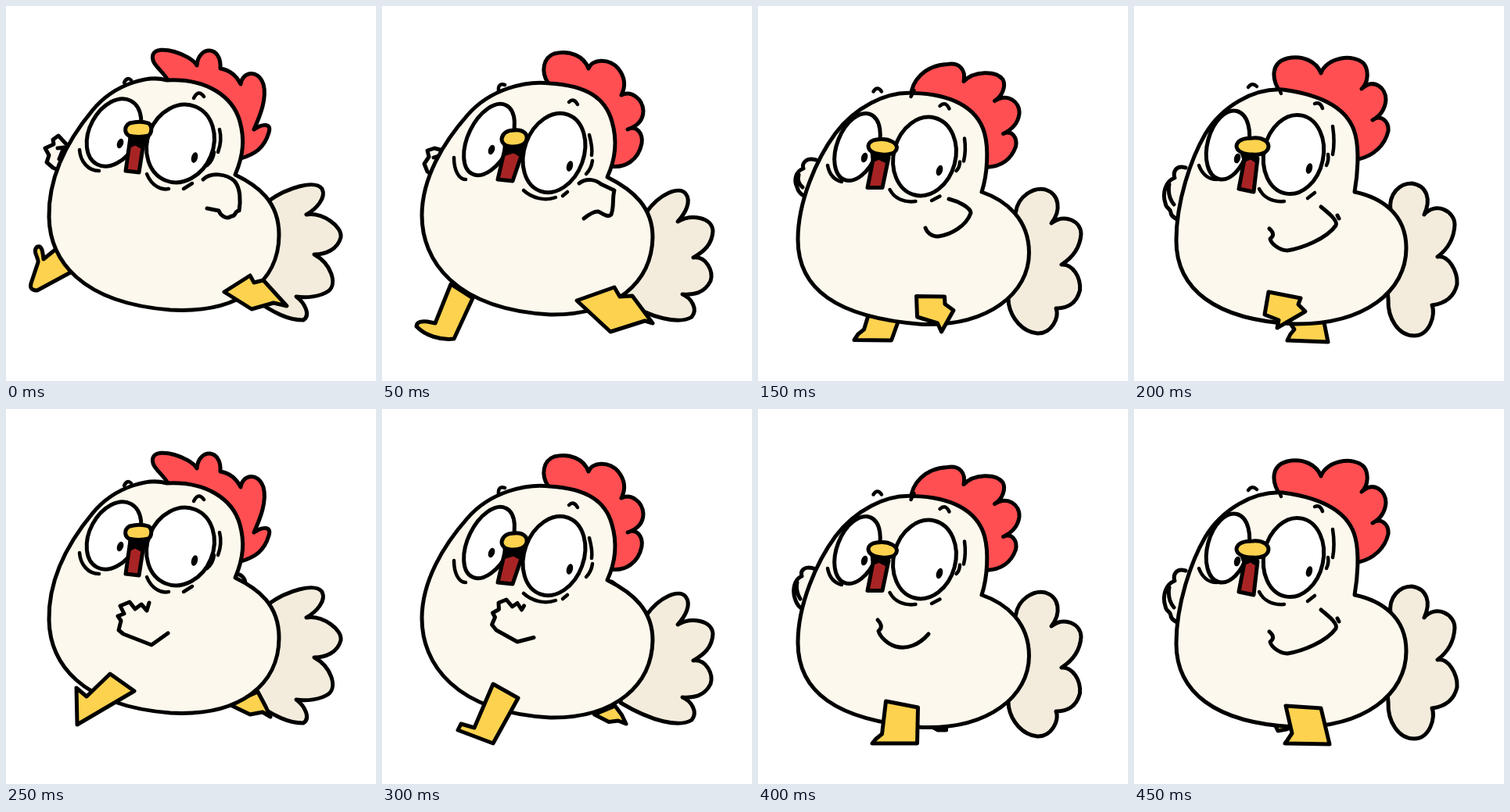
An HTML page for the animation above (0.5 s loop, 473 px wide and 480 px high).

```html
<!DOCTYPE html>
<html lang="en">
<head>
<meta charset="utf-8">
<title>Running chicken</title>
<style>
html, body { margin: 0; width: 100%; height: 100%; overflow: hidden; background: #fff; }
svg { display: block; width: 100vw; height: 100vh; }
</style>
</head>
<body>
<svg id="stage" viewBox="0 0 473 480" stroke="#000" stroke-width="5" stroke-linejoin="round" stroke-linecap="round"></svg>
<script>
const NS = 'http://www.w3.org/2000/svg';
const CREAM = '#fdf8ed', TAIL = '#f3ecdd', RED = '#ff4f52', YELLOW = '#fdd24f';
const STEP = 50;

// Blends two strings that share the same layout of numbers.
function mix(a, b, k = 0.5) {
  const nums = b.match(/-?[\d.]+/g);
  let i = 0;
  return a.replace(/-?[\d.]+/g, n => +(n * (1 - k) + nums[i++] * k).toFixed(2));
}

function mixPose(a, b, k) {
  const out = {};
  for (const key in a) out[key] = mix(a[key], b[key], k);
  return out;
}

// Ellipses are "cx cy rx ry angle".
const stretch = {
  tail: 'M335 250C360 232 395 222 404 234C410 246 396 260 384 267C405 264 430 282 428 296C424 312 408 318 394 318C416 330 424 356 412 365C402 372 384 374 371 372C382 380 390 396 380 402C362 402 345 395 312 372L320 300Z',
  comb: 'M207 95C200 82 184 74 188 62C194 48 236 62 244 76C246 50 276 50 274 80C285 82 294 88 300 100C302 84 322 80 329 100C334 118 325 140 317 158C328 150 340 150 336 162C330 182 318 190 300 195L280 130Z',
  body: 'M205 95C185 88 140 98 111 133C81 169 54 215 55 270C56 325 95 380 210 389C300 394 349 352 349 293C349 250 322 230 293 216C304 190 305 170 299 148C290 115 255 92 205 95Z',
  eyeL: '138 162 31 46 28', eyeR: '223 176 42 51 22',
  pupilL: '146 176 4 6.5 20', pupilR: '241 194 4 7 15',
  mouth: 'M159 168L153 211L170 213L177 168Z',
  maw: 'M157 168L157 182L165 178L174 183L178 168Z',
  beak: 'M158 150C166 148 176 148 182 150C187 153 187 162 182 166C175 168 164 168 157 166C151 162 151 154 158 150Z',
  lines: 'M94 184C95 199 105 211 119 211M180 215C186 230 198 236 208 234M273 158C276 170 274 179 271 187M266 187C265 195 262 200 257 204M227 234L238 227M151 98Q155 90 160 95M240 118Q246 106 253 116'
};

const drop = {
  tail: 'M338 264C355 240 380 230 388 240C396 250 388 265 378 276C395 266 422 270 423 288C422 305 412 314 398 322C415 320 424 340 420 352C412 368 398 370 384 369C396 374 404 388 396 398C380 408 345 400 305 376L310 300Z',
  comb: 'M212 98C203 84 206 66 220 61C240 56 258 64 264 80C268 68 290 66 302 80C310 90 312 102 306 114C318 108 333 118 334 134C334 146 326 154 314 158C326 152 334 164 332 176C328 196 312 208 292 205L270 150Z',
  body: 'M215 99C185 95 138 106 109 140C79 174 51 220 51 268C51 325 92 388 215 395C300 396 345 352 346 296C346 258 322 236 288 219C299 195 301 172 294 148C286 118 262 102 215 99Z',
  eyeL: '137 171 27 49 26', eyeR: '220 188 38 52 20',
  pupilL: '140 184 4 6.5 20', pupilR: '240 205 4 7 15',
  mouth: 'M157 183L148 222L167 224L181 183Z',
  maw: 'M155 178L155 192L168 188L177 193L182 180Z',
  beak: 'M169 159C180 158 186 163 185 170C184 177 176 180 168 180C158 180 153 176 153 170C154 163 160 159 169 159Z',
  lines: 'M92 194C92 210 98 222 107 222M181 236C192 246 208 250 222 245M265 165C268 176 269 184 268 191M269 198C268 206 265 211 261 215M231 243L237 238M149 109Q148 98 157 101M239 123Q245 117 250 126'
};

const squash = {
  tail: 'M331 266C340 246 365 236 380 243C396 252 396 275 379 289C398 280 416 288 416 304C414 322 403 333 388 341C403 342 412 355 410 372C405 388 394 394 381 391C386 402 372 418 356 416C338 412 324 400 316 388L310 300Z',
  comb: 'M203 120C218 100 250 80 288 82C300 82 298 92 287 107C305 100 328 104 332 114C334 122 326 132 314 137C332 130 348 140 346 156C344 168 334 176 322 181C332 178 338 188 334 200C326 216 314 219 297 217L270 160Z',
  body: 'M208 116C175 112 135 132 107 162C77 196 48 250 48 298C48 360 94 396 215 408C295 412 345 370 345 322C345 280 318 252 290 238C301 215 302 180 296 160C286 130 255 112 208 116Z',
  eyeL: '134 183 26 45 28', eyeR: '222 195 41 51 18',
  pupilL: '140 193 4 6.5 20', pupilR: '240 213 4 7 20',
  mouth: 'M154 192L146 231L165 227L176 193Z',
  maw: 'M152 188L151 200L160 197L172 201L178 190Z',
  beak: 'M163 172C173 172 183 178 183 183C182 190 173 191 165 190C157 189 151 185 151 179C152 174 157 172 163 172Z',
  lines: 'M95 204C95 214 99 223 108 228M177 236C183 247 195 253 211 250M274 185C275 193 274 200 272 207M268 209C267 213 265 216 261 218M222 252L234 248M149 115Q154 106 159 116M234 131Q241 120 248 132M203 120L213 109'
};

const rise = {
  tail: 'M328 262C325 240 340 227 355 227C375 230 380 248 371 267C385 250 410 262 410 280C409 300 400 312 388 321C402 318 414 340 413 356C409 374 396 381 381 383C386 395 378 422 358 422C338 422 324 400 325 375L320 320Z',
  comb: 'M188 112C174 92 176 72 196 67C216 62 234 72 239 86C246 66 280 60 294 74C300 82 300 98 291 106C306 92 322 104 322 120C321 132 316 140 305 146C316 138 326 148 325 160C321 178 306 192 287 196L265 150Z',
  body: 'M190 107C152 105 112 129 91 164C73 195 54 250 54 300C54 362 103 402 205 407C295 408 348 365 348 310C348 265 315 245 282 238C286 215 288 185 283 165C274 128 235 113 190 107Z',
  eyeL: '120 178 26 45 15', eyeR: '204 190 38 51 12',
  pupilL: '132 195 4 6.5 15', pupilR: '224 208 4 7 15',
  mouth: 'M142 192L134 234L153 238L158 195Z',
  maw: 'M136 188L140 200L149 196L158 202L159 190Z',
  beak: 'M152 169C164 168 172 173 172 180C171 188 162 191 152 190C140 190 131 186 131 179C132 172 141 169 152 169Z',
  lines: 'M83 204C87 215 95 222 106 222M160 234C166 246 178 251 192 250M254 154C256 167 256 180 254 190M248 190C249 196 248 200 246 204M222 246L231 239M146 104Q151 97 157 103M231 125Q238 122 241 131M188 112L186 107'
};

const hop = mixPose(squash, rise, 0.5);
const poses = [stretch, drop, squash, hop, rise];

const fistA = 'M207 287L186 302L150 288L144 283L147 271L143 265L151 262L146 252L158 247L165 256L173 250L180 258L183 248';
const fistC = 'M181 298L160 294L142 278L137 269L142 262L140 257L148 251L152 244L160 241L168 250L173 247L177 256L180 256';
const crook = 'M239 257C250 266 261 275 258 281C246 298 215 310 196 313C188 313 176 306 174 298C178 295 180 291 173 285M260 268L262 272';
const nearArms = [
  'M252 222C262 212 282 215 292 224C300 233 300 250 298 262C292 262 294 270 288 269C282 274 274 268 272 262L257 259',
  'M252 227C262 219 274 223 280 228L297 236C294 248 297 256 293 267C288 272 280 264 276 263C270 263 263 268 258 272',
  'M249 237C258 230 274 232 284 237L292 243C287 252 292 258 289 268C284 274 278 272 274 268L257 270',
  'M244 247C256 250 272 258 272 265C266 282 246 293 230 295C222 295 216 290 214 284',
  crook,
  fistA,
  mix(fistA, fistC),
  fistC,
  'M218 288C206 302 190 308 176 304C166 301 156 292 154 284C160 280 157 274 153 270',
  crook
];

const sideArm = 'M66 207C52 203 50 214 52 220C40 224 36 240 40 252C41 260 46 258 47 264C47 268 50 271 60 275M45 228C43 240 46 248 51 254';
const farArms = [
  'M80 180L67 166L60 171L61 177L50 182L55 191L52 200L60 207L74 213M66 182L74 181L68 196',
  'M82 186L67 182L58 185L60 193L54 202L58 212L74 222M66 194L72 192',
  'M82 190L72 185L65 189L65 194L55 198L59 208L66 208L62 217L78 226M66 197L74 196L67 207',
  'M74 197C60 193 56 203 58 208C47 212 46 224 50 232C52 240 57 243 68 247M52 216C50 224 53 229 57 232',
  sideArm,
  'M292 212C300 210 306 216 306 224L290 226Z',
  'M288 221C294 219 301 225 301 232L286 234Z',
  'M288 232C295 230 300 236 300 244L284 246Z',
  'M74 205C58 199 54 208 56 214C46 218 44 232 47 242C50 252 54 256 66 260M50 222C48 232 51 238 54 243',
  sideArm
];

const lift = 'M233 377L264 370L268 381L281 388L286 422L274 410L240 401Z';
const pass = 'M172 366L213 374L210 382L219 391L183 412L185 402L167 395Z';
const plant = 'M133 368L170 381L157 427L99 428L105 421L115 417Z';
const under = 'M194 380L239 383L250 429L193 428L196 424L202 415Z';
const nearLegs = [
  'M279 366L312 345L317 354L329 351L359 384L342 380L314 388Z',
  'M249 377L297 360L304 372L320 371L346 406L336 403L292 417Z',
  lift, mix(lift, pass), pass,
  'M133 339L164 361L91 404L90 357L103 368Z',
  'M142 352L174 370L142 428L97 411L101 403L118 408Z',
  plant, mix(plant, under), under
];

const farPlant = 'M87 374L120 390L93 426L50 427L56 420L66 414Z';
const farUnder = 'M199 405L243 405L248 430L196 428L200 420L205 414Z';
const farBack = 'M285 378L322 362L332 381L338 394L328 388L312 391Z';
const farLift = 'M258 404L274 398L281 402L286 412L276 410L268 410Z';
const farPass = 'M184 400L200 398L200 408L195 410L184 412L181 406Z';
const farLegs = [
  'M40 308C46 306 47 315 48 324L64 311L88 338L40 364C34 364 30 362 32 355L41 328C42 322 33 314 40 308Z',
  'M88 356L116 374L92 426C75 428 55 422 44 410C44 404 52 403 58 404L68 406Z',
  farPlant, mix(farPlant, farUnder), farUnder,
  farBack, mix(farBack, farLift), farLift, mix(farLift, farPass), farPass
];

const stage = document.getElementById('stage');
const parts = {};
function add(name, tag, fill, extra = {}) {
  const el = document.createElementNS(NS, tag);
  el.setAttribute('fill', fill);
  for (const key in extra) el.setAttribute(key, extra[key]);
  parts[name] = stage.appendChild(el);
}

add('tail', 'path', TAIL);
add('comb', 'path', RED);
add('farArm', 'path', CREAM);
add('farLeg', 'path', YELLOW);
add('body', 'path', CREAM);
add('eyeL', 'ellipse', '#fff');
add('eyeR', 'ellipse', '#fff');
add('pupilL', 'ellipse', '#000', { stroke: 'none' });
add('pupilR', 'ellipse', '#000', { stroke: 'none' });
add('mouth', 'path', '#a82424');
add('maw', 'path', '#000', { 'stroke-width': 1 });
add('beak', 'path', YELLOW);
add('lines', 'path', 'none', { 'stroke-width': 4.5 });
add('nearLeg', 'path', YELLOW);
add('nearArm', 'path', CREAM);

function place(name, shape) {
  const el = parts[name];
  if (el.tagName === 'path') return el.setAttribute('d', shape);
  const [cx, cy, rx, ry, angle] = shape.split(' ');
  const attrs = { cx, cy, rx, ry, transform: `rotate(${angle} ${cx} ${cy})` };
  for (const key in attrs) el.setAttribute(key, attrs[key]);
}

function draw(ms) {
  const i = Math.floor(ms / STEP) % nearLegs.length;
  const pose = poses[i % poses.length];
  for (const name in pose) place(name, pose[name]);
  place('farArm', farArms[i]);
  place('farLeg', farLegs[i]);
  place('nearLeg', nearLegs[i]);
  place('nearArm', nearArms[i]);
}

let start;
function tick(now) {
  start ??= now;
  draw(Math.max(0, now - start));
  requestAnimationFrame(tick);
}
draw(0);
requestAnimationFrame(tick);
</script>
</body>
</html>
```
